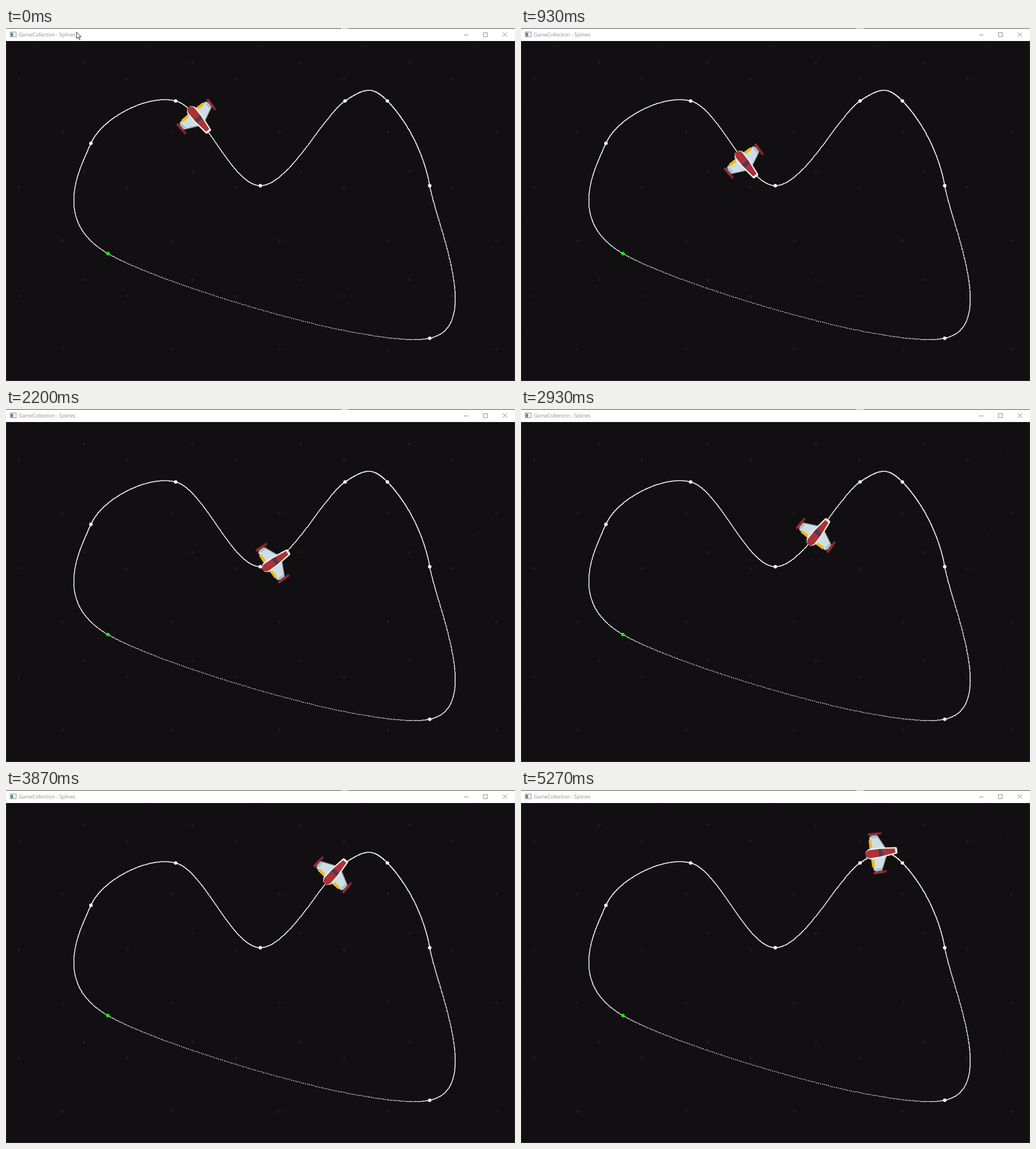
Recreate the animation shown at these times as an HTML page. Size 899 by 623 pixels, loop 5340 ms.

```html
<!DOCTYPE html>
<html lang="en">
<head>
<meta charset="utf-8">
<title>Splines</title>
<style>
  html, body { margin: 0; width: 100%; height: 100%; overflow: hidden; background: #110f12; }
  svg { display: block; }
  text { font: 8.7px "Open Sans", "Noto Sans", sans-serif; fill: #8e8e8e; }
</style>
</head>
<body>
<svg width="899" height="623" viewBox="0 0 899 623">
  <defs>
    <pattern id="stars" width="191.5" height="191.5" y="24" patternUnits="userSpaceOnUse">
      <path d="M134.5 37.5h7m-3.5 -3.5v7M19 66h7m-3.5 -3.5v7M96.5 160h7m-3.5 -3.5v7" stroke="#201f21" stroke-width="1.3"/>
      <path d="M58 7h2M92 54h2M182 74h2M9 124h2M38 95h2M134 181h2" stroke="#1d1c1e" stroke-width="1.5"/>
    </pattern>
    <g id="wing">
      <path d="M-19.5 7L-17 29L-13 31.5H-4L-2 28L8 7Z" fill="#cddfe6" stroke="#91a8ab" stroke-width="1.5"/>
      <path d="M-14 28.5H-4" stroke="#a3b9be" stroke-width="2.5"/>
      <path d="M-17 11V24" stroke="#f3b90b" stroke-width="5"/>
      <path d="M-17 34.3L3 33.8" stroke="#7c2528" stroke-width="4.6" stroke-linecap="round"/>
      <path d="M-16.5 34L-4 33.8" stroke="#a03033" stroke-width="3" stroke-linecap="round"/>
    </g>
  </defs>

  <rect width="899" height="623" fill="#110f12"/>
  <rect y="24" width="899" height="599" fill="url(#stars)"/>
  <path d="M.5 23V622.5H898.5V23" fill="none" stroke="#2c2b2e"/>
  <rect width="899" height="23" fill="#fff"/>
  <path d="M0 .5H899" stroke="#4b4b4d"/>
  <path d="M592 .5H605" stroke="#b5b5b5"/>

  <rect x="7.5" y="7" width="10.5" height="8.5" fill="#f4f6f6" stroke="#8d9395"/>
  <rect x="8.5" y="8.5" width="4" height="6" fill="#438a88"/>
  <text x="22.5" y="15">GameCollection - Splines</text>
  <path d="M809 12.2H817M843.2 8.2H850.2V15.2H843.2ZM877.2 7.7L884.8 15.3M884.8 7.7L877.2 15.3" fill="none" stroke="#858585"/>

  <g id="track" transform="translate(.4 24) scale(.748)">
    <path id="curve" fill="#fff"/>
  </g>

  <g id="ship">
    <use href="#wing"/>
    <use href="#wing" transform="scale(1 -1)"/>
    <path d="M-28 -4L-22 -9L-4 -9.3L27 -5.7L28.3 -4V4L27 5.7L-4 9.3L-22 9L-28 4Z" fill="#efeeea"/>
    <path d="M-28 -3.5L-22 -7L-2 -6.8L24.5 -3.6V3.6L-2 6.8L-22 7L-28 3.5Z" fill="#ab3236"/>
    <path d="M-4.5 -6.5L2.5 -5.5V5.5L-4.5 6.5Z" fill="#473c56"/>
  </g>

  <path id="cursor" d="M124.6 7.2V18.4L127.2 16L129.1 20.2L131 19.4L129.2 15.3H132.6Z" fill="#fff" stroke="#111" stroke-width=".9"/>
</svg>

<script>
const LOOP = 5340, STEPS = 80, FPS = 15;
const START = 2.275, SPEED = 0.41;
const points = [[240, 500], [200, 240], [400, 140], [600, 340],
                [800, 140], [900, 140], [1000, 340], [1000, 700]];
const el = id => document.getElementById(id);

// Closed Catmull-Rom spline: position and slope on one axis.
function axis(t, k) {
  const i = Math.floor(t), u = t - i, n = points.length;
  const [a, b, c, d] = [-1, 0, 1, 2].map(o => points[(i + o + n) % n][k]);
  const q1 = c - a, q2 = 2 * a - 5 * b + 4 * c - d, q3 = 3 * (b - c) + d - a;
  return {
    pos: (2 * b + u * (q1 + u * (q2 + u * q3))) / 2,
    slope: (q1 + u * (2 * q2 + 3 * u * q3)) / 2
  };
}

function drawTrack() {
  let d = "";
  for (let i = 0; i < points.length * 200; i++) {
    const [x, y] = [0, 1].map(k => Math.round(axis(i / 200, k).pos) - 1);
    d += `M${x} ${y}h2v2h-2z`;
  }
  el("curve").setAttribute("d", d);
  points.forEach(([cx, cy], i) => {
    const dot = document.createElementNS("http://www.w3.org/2000/svg", "circle");
    const attrs = { cx, cy, r: 4.1, fill: i ? "#fff" : "#0f0" };
    for (const name in attrs) dot.setAttribute(name, attrs[name]);
    el("track").append(dot);
  });
}

function pose(ms) {
  // Steps of 1/15 s, rounded to 10 ms.
  const step = Math.min(STEPS - 1, Math.floor((Math.floor(ms / 10) * 10 + 5) * FPS / 1000));
  const t = START + SPEED * step / FPS;
  const x = axis(t, 0), y = axis(t, 1);
  const angle = Math.atan2(y.slope, x.slope) * 180 / Math.PI;
  el("ship").setAttribute("transform",
    `translate(${0.4 + x.pos * 0.748} ${24 + y.pos * 0.748}) rotate(${angle})`);
  el("cursor").style.visibility = step ? "hidden" : "visible";
}

drawTrack();
pose(0);
const begin = performance.now();
(function tick() {
  pose((performance.now() - begin) % LOOP);
  requestAnimationFrame(tick);
})();
</script>
</body>
</html>
```
